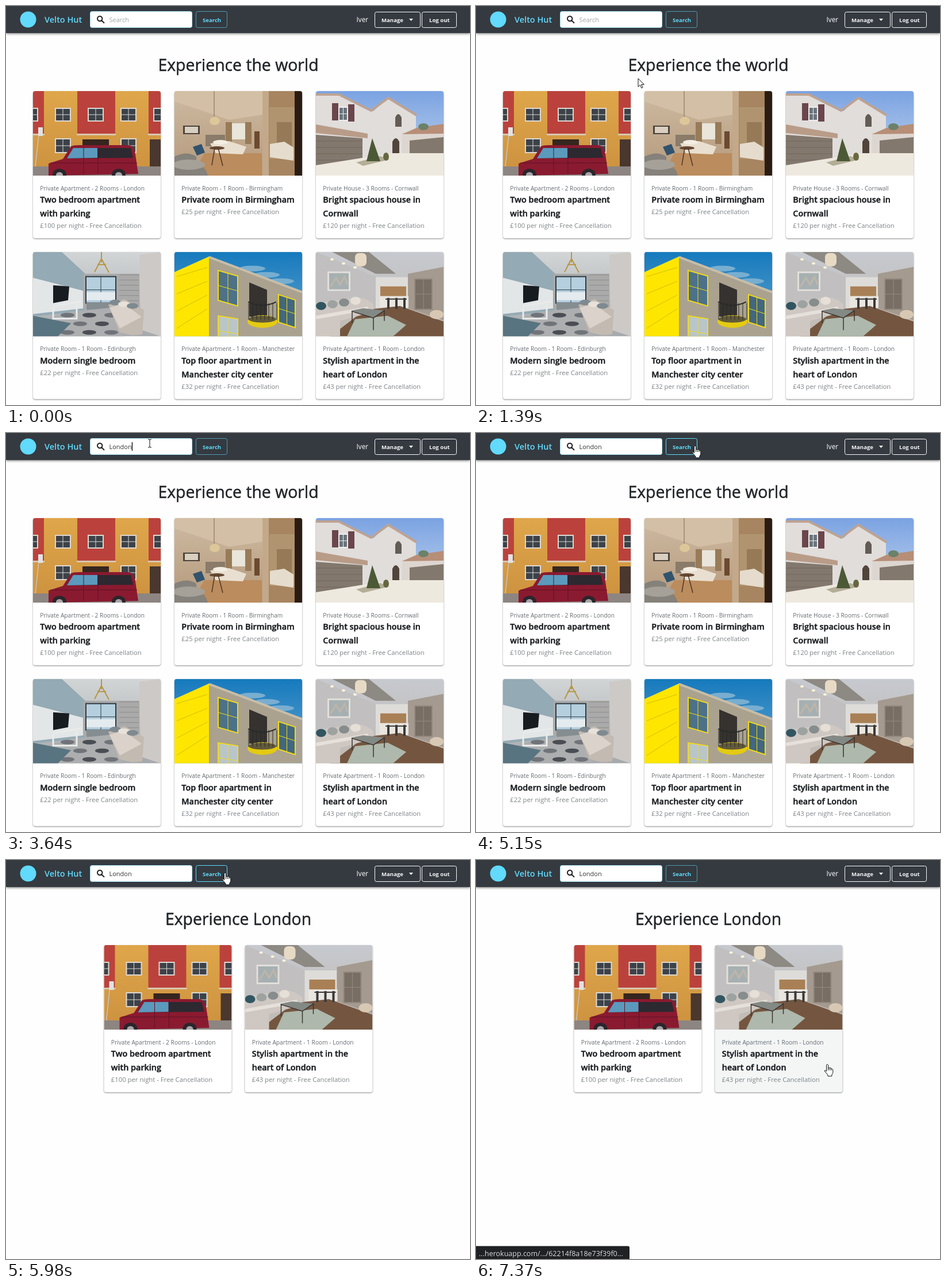
An HTML page for the animation above (8000 ms loop, 807x694 px).

```html
<!DOCTYPE html>
<html lang="en">
<head>
<meta charset="utf-8">
<title>Room search</title>
<style>
html, body { margin: 0; width: 100%; height: 100%; overflow: hidden; background: #fefefe; }
svg { display: block; font-family: "Open Sans", "Noto Sans", sans-serif; }
.sheet { filter: drop-shadow(0 1px 1px #0007); }
.nav { filter: drop-shadow(0 1px 2px #0009); }
.strong { stroke: #1a1d20; stroke-width: .45px; }
</style>
</head>
<body>
<svg id="stage" width="807" height="694" viewBox="0 0 807 694"></svg>
<script>
const W = 222, H = 147, CARD = 256;
const times = (n, f) => Array.from({ length: n }, (_, i) => f(i)).join('');
const rect = (x, y, w, h, fill, more = '') =>
  `<rect x="${x}" y="${y}" width="${w}" height="${h}" fill="${fill}" ${more}/>`;
const shape = (d, fill) => `<path d="${d}" fill="${fill}"/>`;
const oval = (x, y, rx, ry, fill) => `<ellipse cx="${x}" cy="${y}" rx="${rx}" ry="${ry}" fill="${fill}"/>`;
const line = (d, stroke, w = 1) => `<path d="${d}" fill="none" stroke="${stroke}" stroke-width="${w}"/>`;
const text = (x, y, size, str, fill, weight = 400, more = '') =>
  `<text x="${x}" y="${y}" font-size="${size}" font-weight="${weight}" fill="${fill}" ${more}>${str}</text>`;

let fades = '', fadeCount = 0;
function backdrop(top, bottom) {
  const id = 'fade' + fadeCount++;
  fades += `<linearGradient id="${id}" x2="0" y2="1"><stop stop-color="${top}"/>` +
    `<stop offset="1" stop-color="${bottom}"/></linearGradient>`;
  return rect(0, 0, W, H, `url(#${id})`);
}

// Window with frame, panes and glazing bars; slope skews it into perspective
const pane = (x, y, w, h, frame, glass, slope = 0) =>
  `<g transform="translate(${x} ${y}) skewY(${slope})">` + rect(0, 0, w, h, frame) +
  rect(2, 2, w - 4, h - 4, glass) + line(`M0 ${h / 2}h${w}M${w / 2} 0v${h}`, frame) + '</g>';

const photos = [
  // Brick house and van
  () => backdrop('#dfa64a', '#cc913f') +
    times(3, i => rect(124 * i - 47, 0, 66, 75, '#bb423c') + rect(124 * i - 48, 74, 68, 3, '#d8c6b0')) +
    times(5, i => pane(57 * i - 19, 29, 28, 24, '#ddd8d0', '#3c4249') +
      (i % 2 ? pane(57 * i - 19, 82, 28, 26, '#ddd8d0', '#3c4249') : '')) +
    rect(86, 84, 46, 20, '#35261f') + rect(203, 84, 19, 48, '#4a372e') + rect(0, 131, W, 16, '#8d8581') +
    line('M11 66L4 131', '#c7c5c2', 1.5) + rect(9, 63, 8, 15, '#dfe3e3') +
    shape('M27 147V126L52 118 66 96Q70 94 80 94H166Q176 95 178 110L183 144Z', '#8a1a30') +
    shape('M59 117L70 99H170L174 116Z', '#2c2930') + shape('M59 117L70 99H112V116Z', '#5b9abd') +
    line('M88 97V144M113 97V144M30 125H181', '#5f1225') +
    times(2, i => oval(46 + 103 * i, 145, 12, 10, '#29262c') + oval(46 + 103 * i, 146, 6, 5, '#aaa5a8')),

  // Hotel room
  () => backdrop('#cdbaa2', '#b5997b') + shape('M0 0H160V40L95 50 0 18Z', '#d3bfa5') +
    shape('M52 108H152V147H30Z', '#bb8c5d') + rect(99, 56, 25, 28, '#e9e5da') +
    times(2, i => rect(89 + 34 * i, 54, 11, 38, '#987b58')) + rect(139, 70, 9, 30, '#6c492f') +
    rect(15, 60, 29, 15, '#4d443c') + rect(18, 62, 23, 11, '#d8cfc0') +
    rect(54, 76, 34, 20, '#8a7b6a') + shape('M62 91L95 87 125 97 119 110 72 108Z', '#e9dfd0') + oval(80, 89, 13, 4, '#f4ede2') +
    shape('M0 114Q22 103 38 114V126Q54 130 58 147H0Z', '#85817b') + oval(25, 128, 28, 9, '#a5a098') +
    shape('M32 97L47 92 53 107 39 112Z', '#31536e') + oval(74, 99, 13, 3, '#664832') + line('M70 99L65 129M76 99L84 130', '#4d3526', 1.5) +
    line('M69 0V44', '#7a6954') + oval(70, 52, 9, 7, '#ddc79a') +
    rect(153, 0, 69, H, '#a78560') + rect(153, 0, 11, H, '#c3a98a') + rect(165, 28, 46, 90, '#b09470') +
    rect(178, 54, 26, 44, '#967a57') + shape('M166 92L191 88 207 98V121L166 115Z', '#e6dccd') + rect(209, 0, 13, H, '#2b1c13'),

  // Villa
  () => backdrop('#7ba3e2', '#c9daee') + shape('M0 6H40L100 35 126 10 174 42V118H0Z', '#e0dddb') +
    line('M0 6H40L96 34 126 12 175 42', '#bea290', 4) + rect(150, 72, 72, 40, '#ddd6d0') +
    shape('M0 58L90 74V82L0 73Z', '#b99c88') + shape('M150 75L175 64 222 57V74Z', '#b78e77') +
    shape('M0 76L81 82V127L0 130Z', '#83786d') + shape('M163 86L222 80V112H163Z', '#83786d') +
    times(4, i => line(`M0 ${87 + 11 * i}H81`, '#71675e')) +
    times(2, i => rect(28 + 28 * i, 21 + 2 * i, 11, 30, '#6b464c')) + pane(39, 27, 17, 25, '#eee', '#69747c') +
    shape('M138 62V46Q143 34 149 46V62Z', '#625c55') + shape('M133 108V88Q139 76 145 88V108Z', '#51443b') +
    shape('M0 129L132 108H222V147H0Z', '#eee9df') + shape('M70 124L112 113 128 119 82 130Z', '#b3ad96') +
    shape('M98 82L112 122H88Z', '#4b5936') + oval(122, 114, 5, 7, '#65683f') + oval(187, 62, 9, 6, '#6b8168'),

  // Single bedroom
  () => backdrop('#d2d5d6', '#a6a9ac') + shape('M0 0H50L91 38V103L0 112Z', '#94aab4') +
    shape('M0 45L89 68V98L0 108Z', '#e3e6e7') + rect(87, 38, 98, 62, '#a9aaa9') +
    pane(91, 42, 54, 48, '#2f3b45', '#b5cfde') + rect(93, 70, 50, 14, '#e4ebee') + rect(93, 88, 49, 13, '#858d90') +
    times(6, i => line(`M150 ${40 + 9 * i}H184`, '#8f8c8a')) + shape('M185 5L222 0V147L187 135Z', '#cdc9c7') +
    shape('M66 104L145 96 158 147H0V123Z', '#acaeaf') +
    times(9, i => oval(60 + i % 3 * 38 - (i / 3 & 1) * 16, 110 + (i / 3 | 0) * 15, 12, 4, i % 2 ? '#4a4e54' : '#707479')) +
    shape('M35 58L63 60 61 84 35 89Z', '#171c21') + shape('M0 111L66 124 43 147H0Z', '#587480') +
    line('M35 96V116H76V91M35 94L85 86', '#e9ebea', 3) +
    shape('M131 92L159 82 193 101 190 143Q172 148 150 139Z', '#c3bab1') + shape('M133 97L158 90 189 113 151 133Z', '#dbd3cb') +
    times(3, i => oval(143 + 15 * i, 88 + 3 * i, 10, 5, i % 2 ? '#e7e1da' : '#7e8a90')) +
    line('M119 0V18M107 35L119 12 132 36M112 22H127', '#b69745', 2),

  // Yellow block
  () => backdrop('#167abd', '#68a6cf') + times(3, i => oval(135 + 25 * i, 29 + 11 * i, 23, 5, '#78aed0')) +
    shape('M60 8L222 69V147H60Z', '#aaa28f') + line('M60 9L222 70', '#c8bda8', 4) + shape('M0 35L60 8V147H0Z', '#fee600') +
    times(4, i => line(`M4 ${43 + 30 * i}L57 ${27 + 24 * i}`, '#d3be00')) +
    pane(75, 31, 36, 54, '#f2da18', '#4d7187', 16) + pane(75, 110, 36, 54, '#f2da18', '#b9c5c7', 9) +
    pane(180, 73, 31, 50, '#f2da18', '#42677f', 18) + shape('M130 53L161 66V119L130 112Z', '#35322f') +
    oval(153, 121, 26, 11, '#e4ca12') + oval(153, 117, 24, 6, '#625a39') + line('M128 87Q153 99 177 87', '#292a29', 2) +
    times(8, i => line(`M${129 + 7 * i} 89v29`, '#292a29')),

  // Living room
  () => backdrop('#c6c9cf', '#c1b9b2') + shape('M28 0H92L139 38H104Z', '#8d8983') + shape('M0 0L105 44V98L0 118Z', '#c1bfbf') +
    rect(104, 44, 56, 54, '#dedcd9') + shape('M160 38L222 26V119L160 98Z', '#a49a8f') +
    rect(112, 60, 45, 17, '#a98055') + rect(111, 77, 50, 20, '#e9e5df') + pane(171, 46, 32, 55, '#968a80', '#786e64') +
    shape('M85 101L146 94 222 121V147H25Z', '#745640') + shape('M68 117L125 111 157 127 134 147H54Z', '#aeb8ac') +
    rect(20, 34, 40, 34, '#e2dfda') + rect(23, 37, 34, 28, '#a6b0b2') + line('M25 61L35 45 42 57 50 43 55 57', '#bfb5a8', 3) +
    shape('M0 89L70 79Q86 78 100 91V104L42 120V147H0Z', '#cfc8c2') + line('M0 114L91 98', '#e6e0da', 6) +
    times(4, i => oval(9 + 20 * i, 94 - 3 * i, 9, 7, ['#315561', '#9da3a1', '#868d8c', '#e5dfd7'][i])) +
    shape('M62 102L82 98 119 102 100 115Z', '#838985') + line('M62 103L100 115 119 102V120M63 103V124M100 115V136', '#393431', 1.5) +
    line('M121 82H158', '#3a3939', 2) + times(3, i => line(`M${126 + 14 * i} 80v19`, '#393938', 4)) +
    oval(210, 109, 12, 8, '#d7c8b4') + rect(68, 2, 20, 23, '#e7dac5', 'rx="7"') +
    times(3, i => oval(28 + 20 * i, 13 + 7 * i, 3, 2, '#fff4d8'))
];

const rooms = [
  ['Private Apartment - 2 Rooms - London', ['Two bedroom apartment', 'with parking'], 100],
  ['Private Room - 1 Room - Birmingham', ['Private room in Birmingham'], 25],
  ['Private House - 3 Rooms - Cornwall', ['Bright spacious house in', 'Cornwall'], 120],
  ['Private Room - 1 Room - Edinburgh', ['Modern single bedroom'], 22],
  ['Private Apartment - 1 Room - Manchester', ['Top floor apartment in', 'Manchester city center'], 32],
  ['Private Apartment - 1 Room - London', ['Stylish apartment in the', 'heart of London'], 43]
];

const card = ([meta, title, price], i) => '<g class="card">' +
  rect(0, 0, W, CARD, '#fff', 'rx="4" class="sheet"') + `<g clip-path="url(#photo)">${photos[i]()}</g>` +
  text(12.3, 172.5, 10.2, meta, '#666c72') +
  title.map((s, n) => text(12.3, 194 + 24 * n, 14.4, s, '#1a1d20', 600, 'class="strong"')).join('') +
  text(12.3, 190.5 + 23.7 * title.length, 11.3, `£${price} per night - Free Cancellation`, '#7d8286') + '</g>';

const button = (x, y, w, h, color, label, textX) =>
  rect(x + .5, y + .5, w, h, 'none', `rx="3" stroke="${color}"`) + text(textX, 27.5, 9.6, label, color, 700);

const page = rooms.map(card).join('') +
  text(404, 112.5, 28.4, '', '#212529', 400, 'id="heading" class="strong" text-anchor="middle"') +
  rect(0, 0, 807, 47, '#343a40', 'class="nav"') + oval(38.5, 23.5, 14, 14, '#61dafb') +
  text(67, 29, 14.5, 'Velto Hut', '#61dafb', 600) +
  rect(146.5, 9.5, 177, 28, '#fff', 'rx="3" stroke="#a5e3f5"') +
  line('M166.3 25.1L171 29.8M167.4 22a4.2 4.2 0 1 0-8.4 0a4.2 4.2 0 1 0 8.4 0', '#222', 2) +
  text(179.5, 28, 11, '', '', 400, 'id="query"') + rect(0, 16, 1.4, 15, '#111', 'id="caret"') +
  `<g id="search">${button(330, 9, 54, 28, '#61dafb', 'Search', 342)}</g>` +
  text(630, 28, 11.7, 'Iver', '#fff', 400, 'text-anchor="end"') +
  button(641, 10, 79, 27, '#f8f9fa', 'Manage', 653) + shape('M701 22H708L704.5 26Z', '#fff') +
  button(723, 10, 60, 27, '#f8f9fa', 'Log out', 736) +
  `<g id="status">${shape('M0 671.5H264Q267 671.5 267 674.5V694H0Z', '#202124')}` +
  text(5, 689, 12.5, '...herokuapp.com/.../62214f8a18e73f39f0...', '#dadce0') + '</g>' +
  '<path id="cursor" stroke="#111" stroke-linejoin="round"/>';

document.getElementById('stage').innerHTML = `<defs>${fades}<clipPath id="photo">` +
  `<path d="M0 ${H}V4Q0 0 4 0H218Q222 0 222 4V${H}Z"/></clipPath></defs>` + page;

const pointers = {
  arrow: 'M0 0V14.5L3.4 11.3 5.8 16.7 8 15.7 5.7 10.5H10.3Z',
  hand: 'M-1.5 12.5V1.5Q0-1 1.5 1.5V7Q6 5 9.8 10V14.5Q9 17 7.8 18.5V21H1V19L-4.8 12Q-4.5 9.500-1.5 12.5ZM1.5 7v4M4.3 7v4M7 8v3',
  beam: 'M-3-7H-1L0-6 1-7H3M0-6V6M-3 7H-1L0 6 1 7H3'
};

const speedUp = p => p ** 1.3, slowDown = p => 1 - (1 - p) ** 2;
const moves = [
  { from: 510, to: 1390, x: 282, y: 126, ease: speedUp },
  { from: 1390, to: 1710, x: 250, y: 18, ease: slowDown },
  { from: 4060, to: 4400, x: 323, y: 35, ease: slowDown },
  { from: 4400, to: 5150, x: 381, y: 22, ease: slowDown },
  { from: 6220, to: 7120, x: 611, y: 355, ease: slowDown }
];
const STEP = 80, FOCUS = 2040, TYPE = 2900, KEY = 148, TYPED = 3640, CLICK = 5150, TITLE = 5730, RESULTS = 5980, STATUS = 7290;
const word = 'London';
const [heading, query, caret, search, status, cursor] =
  ['heading', 'query', 'caret', 'search', 'status', 'cursor'].map(id => document.getElementById(id));
const cards = [...document.querySelectorAll('.card')];
const within = (x, y, left, top, w, h) => x >= left && x < left + w && y >= top && y < top + h;

function pointerAt(t) {
  let x = 575, y = 685;
  for (const m of moves) {
    if (t < m.from) break;
    const p = m.ease(Math.min(1, Math.floor((t - m.from) / STEP) * STEP / (m.to - m.from)));
    const k = t >= m.to ? 1 : p;
    x += (m.x - x) * k;
    y += (m.y - y) * k;
  }
  return [x, y];
}

function caretOn(t) {
  const since = t < TYPE ? FOCUS : TYPED;
  return t >= FOCUS && t < CLICK && (t < since || Math.floor((t - since) / 500) % 2 === 0);
}

function draw(t) {
  const [x, y] = pointerAt(t), filtered = t >= RESULTS, visible = t >= moves[0].from;
  const overSearch = within(x, y, 330, 9, 55, 29);
  let kind = overSearch ? 'hand' : within(x, y, 146, 9, 178, 29) ? 'beam' : 'arrow';

  cards.forEach((el, i) => {
    const shown = !filtered || rooms[i][0].endsWith(word);
    const left = filtered ? (i ? 415.5 : 170.5) : 47 + i % 3 * 246;
    const top = filtered || i < 3 ? 148 : 427.7;
    const hover = visible && shown && within(x, y, left, top, W, CARD);
    if (hover) kind = 'hand';
    el.setAttribute('transform', `translate(${left} ${top})`);
    el.style.display = shown ? '' : 'none';
    el.firstChild.setAttribute('fill', hover ? '#f4f6f6' : '#fff');
  });

  heading.textContent = 'Experience ' + (t < TITLE ? 'the world' : word);
  const count = t < TYPE ? 0 : Math.floor((t - TYPE) / KEY) + 1;
  query.textContent = count ? word.slice(0, count) : 'Search';
  query.setAttribute('fill', count ? '#333' : '#a3a6a8');
  caret.setAttribute('x', 179.5 + (count && query.getComputedTextLength()));
  caret.style.opacity = +caretOn(t);
  search.firstChild.style.opacity = overSearch ? 1 : .6;
  status.style.opacity = t < STATUS ? 0 : t < STATUS + STEP ? .5 : 1;
  cursor.style.opacity = +visible;
  cursor.setAttribute('d', pointers[kind]);
  cursor.setAttribute('fill', kind === 'beam' ? 'none' : '#fff');
  cursor.setAttribute('transform', `translate(${x} ${y})`);
}

function tick() {
  draw(performance.now() % 8000);
  requestAnimationFrame(tick);
}
tick();
</script>
</body>
</html>
```
